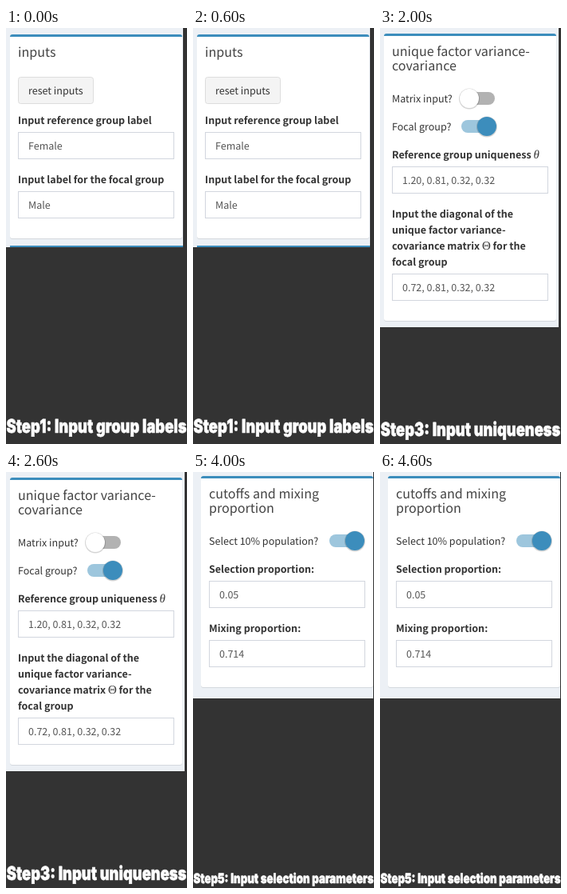
An HTML page that plays this animation: 227x520 px, repeating every 5 s.

```html
<!DOCTYPE html>
<html lang="en">
<head>
<meta charset="utf-8">
<title>Input steps</title>
<style>
html, body { margin: 0; width: 100%; height: 100%; overflow: hidden; background: #333; }
svg { display: block; }
text { font: 12.53px "Noto Sans CJK JP", "Noto Sans CJK SC", "Noto Sans CJK", "Noto Sans", sans-serif; fill: #333; white-space: pre; text-rendering: geometricPrecision; }
.title { font-size: 16.1px; fill: #444; }
.label { font-weight: 700; }
.value { fill: #555; }
.math { font: italic 15px "Liberation Serif", serif; }
.upright { font-style: normal; }
.caption { font: 900 20px Inter, "Liberation Sans", sans-serif; fill: #fff; stroke: #fff; stroke-width: .6px; stroke-linejoin: round; }
.dark { fill: #111; stroke: #111; }
.step { visibility: hidden; animation: show 5s step-end infinite; animation-delay: calc(var(--i) * 1s - 5s); }
@keyframes show { 0% { visibility: visible; } 20%, 100% { visibility: hidden; } }
</style>
</head>
<body>
<svg id="stage" width="227" height="520" viewBox="0 0 227 520"></svg>
<script>
const math = (s, cls = '') => `<tspan class="math ${cls}">${s}</tspan>`;
const text = (cls, x, y, s) => `<text class="${cls}" x="${x}" y="${y}">${s}</text>`;
const rect = (x, y, w, h, fill, more = '') =>
  `<rect x="${x}" y="${y}" width="${w}" height="${h}" fill="${fill}" ${more}/>`;
const lines = (cls, x, y, gap, list) =>
  list.map((s, k) => text(cls, x, y + k * gap, s)).join('');

const panel = (x, top, bottom, width, end) =>
  rect(0, 0, width, end, '#ecf0f5') +
  rect(x, top + 1, 216, bottom - top, '#d5d9de', 'rx="3"') +
  rect(x, top, 216, bottom - top, '#fff', 'rx="3"') +
  `<path d="M${x} ${top + 3}q0-3 3-3h210q3 0 3 3z" fill="#3c8dbc"/>`;

const field = (x, y, s) =>
  rect(x + .5, y + .5, 195, 33, '#fff', 'stroke="#d2d6de"') + text('value', x + 13, y + 22, s);

// Label lines followed by their input field
const group = (x, y, list, value) =>
  lines('label', x, y, 20, list) + field(x, y + 10 + 20 * (list.length - 1), value);

const toggle = (x, y, on, label, left = 15) => {
  const knob = x + (on ? 32 : 8);
  return text('', left, y + 5, label) +
    rect(x, y - 8, 40, 16, on ? '#9dc6dd' : '#b2b2b2', 'rx="8"') +
    `<circle cx="${knob}" cy="${y + .5}" r="13" fill="#000" opacity=".17"/>` +
    `<circle cx="${knob}" cy="${y}" r="12" fill="${on ? '#3c8dbc' : '#fff'}"/>`;
};

// Heavy condensed lettering, one narrowing factor for all captions
const caption = (y, size, s, cls = '') =>
  `<text class="caption ${cls}" text-anchor="middle" transform="translate(113.5 ${y}) scale(.78 1)" style="font-size:${size}px">${s}</text>`;

const steps = [
  panel(5, 8, 263, 222, 274) + rect(5, 272, 217, 2, '#3c8dbc') +
  text('title', 15, 36, 'inputs') +
  rect(15.5, 61.5, 94, 33, '#f4f4f4', 'rx="3" stroke="#ddd"') +
  text('', 28, 83, 'reset inputs') +
  group(15, 120, ['Input reference group label'], 'Female') +
  group(15, 194, ['Input label for the focal group'], 'Male') +
  caption(506, 23.5, 'Step1: Input group labels'),

  panel(5, 8, 423, 227, 431) +
  text('title', 15, 36, 'intercepts and loadings') +
  group(15, 76, ['Reference group factor', `loadings ${math('λ')}`], '1.00, 1.66, 2.30, 2.29') +
  toggle(102, 165, false, 'Focal group?') +
  group(15, 205, ['Reference group measurement', `intercepts ${math('τ')}`], '1.54, 1.36, 1.16, 1.08') +
  group(15, 299, ['Input measurement intercepts', `${math('τ')} for the focal group`], '0.68, 1.36, 1.16, 1.08') +
  toggle(102, 388, true, 'Focal group?') +
  caption(510, 15.6, 'Step 2: Input intercepts and loadings'),

  panel(5, 7, 366, 224, 374) +
  lines('title', 15, 35, 18, ['unique factor variance-', 'covariance']) +
  toggle(104, 88, false, 'Matrix input?') +
  toggle(102, 123, true, 'Focal group?') +
  group(15, 163, [`Reference group uniqueness ${math('θ')}`], '1.20, 0.81, 0.32, 0.32') +
  group(15, 237, ['Input the diagonal of the', 'unique factor variance-',
    `covariance matrix ${math('Θ', 'upright')} for the`, 'focal group'], '0.72, 0.81, 0.32, 0.32') +
  caption(510, 23.5, 'Step3: Input uniqueness'),

  panel(5, 5, 514, 226, 520) +
  text('title', 15, 33, 'mean and variances') +
  group(15, 73, [`Latent factor mean ${math('κ')} for the`, 'reference group:'], '0') +
  rect(187, 113, 9, 15, '#f2f2f2', 'rx="4"') +
  '<path d="M189 119l2.5-3 2.5 3M189 122l2.5 3 2.5-3" fill="none" stroke="#444" stroke-width="1.3"/>' +
  group(15, 167, [`Latent factor mean ${math('κ')} for the`, 'focal group:'], '-0.125') +
  toggle(102, 256, true, 'Focal group?') +
  group(15, 296, [`Latent factor variance ${math('ϕ')} for the`, 'reference group:'], '0.125') +
  group(15, 390, [`Latent factor variance ${math('ϕ')} for the`, 'focal group:'], '0.108') +
  toggle(102, 479, true, 'Focal group?') +
  caption(511, 14.7, 'Step4: Input latent mean and variances', 'dark'),

  panel(10, 5, 269, 226, 283) +
  lines('title', 20, 33, 18, ['cutoffs and mixing', 'proportion']) +
  toggle(171, 86, true, 'Select 10% population?', 20) +
  group(20, 126, ['Selection proportion:'], '0.05') +
  group(20, 200, ['Mixing proportion:'], '0.714') +
  caption(514, 17, 'Step5: Input selection parameters')
];

document.getElementById('stage').innerHTML =
  steps.map((s, i) => `<g class="step" style="--i:${i}">${s}</g>`).join('');
</script>
</body>
</html>
```
